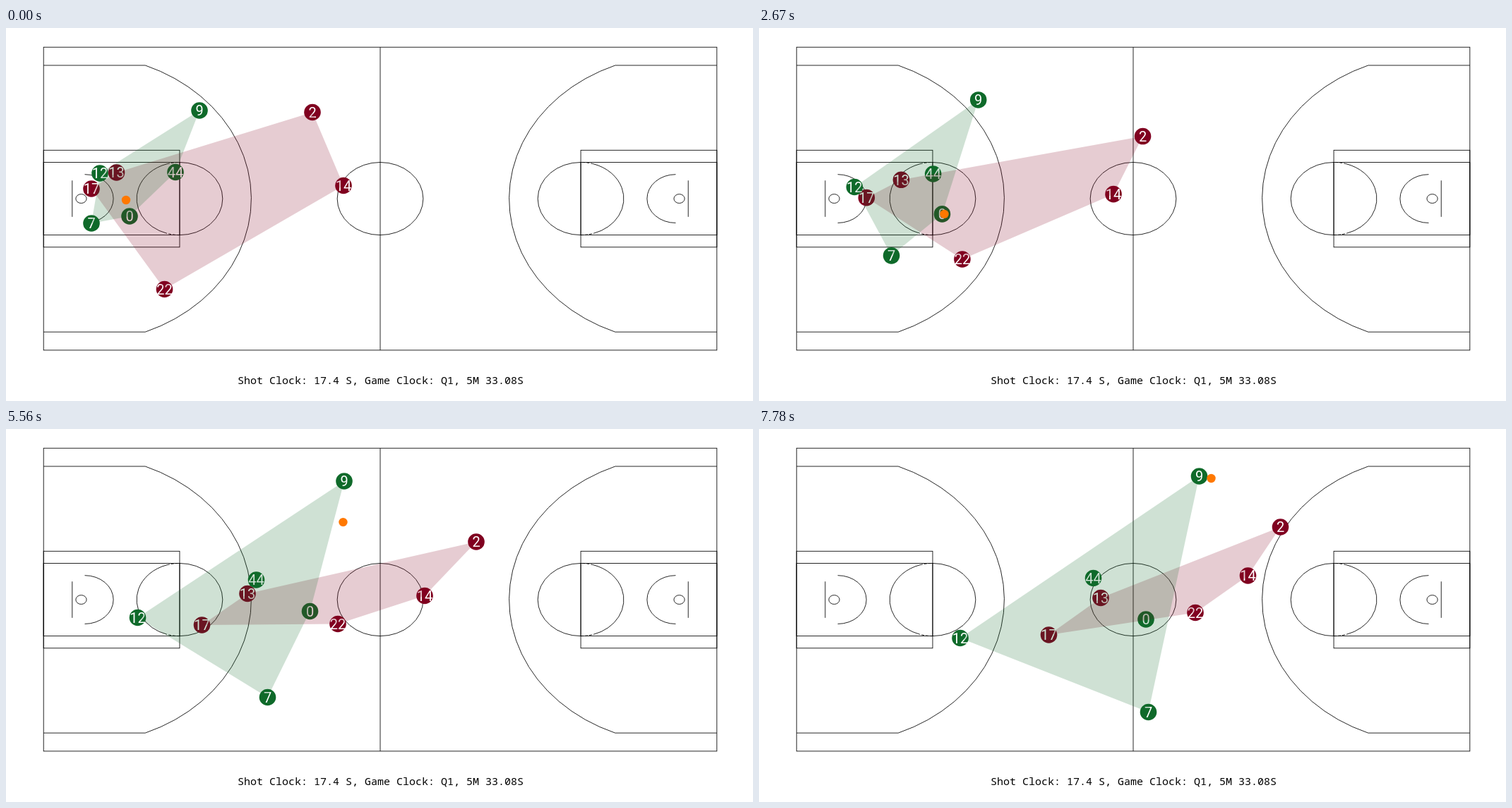
Recreate the animation shown at these times as an HTML page with a canvas. Size 1058x529 px, loop 8000 ms.

```html
<!DOCTYPE html>
<html lang="en">
<head>
<meta charset="utf-8">
<title>Court tracking</title>
<style>
  html, body { margin: 0; width: 100%; height: 100%; overflow: hidden; background: #fff; }
  canvas { display: block; }
</style>
</head>
<body>
<canvas id="stage" width="1058" height="529"></canvas>
<script>
const ctx = document.getElementById('stage').getContext('2d');
const LOOP = 8000, STEPS = 36;

// Court is 94 by 50 feet
const FT_X = 10.145, FT_Y = 8.594;
const courtX = feet => 53.2 + feet * FT_X;
const courtY = feet => 27.2 + feet * FT_Y;

// Each player runs a smooth curve through five points
const keys = [0, 8, 16, 24, 34];
const red = { color: '#800020', players: {
  2:  [[434, 119.5], [506, 146], [582.5, 158], [666, 160], [738.5, 139]],
  13: [[156.5, 205], [179, 215.5], [234.5, 216], [342, 233.5], [484, 239.5]],
  14: [[478, 223.5], [490.5, 233.5], [521, 236.5], [593, 236.5], [692.5, 208]],
  17: [[121, 228], [136, 230.5], [179, 253.5], [277.5, 278], [410.5, 292]],
  22: [[224.5, 370.5], [250.5, 343.5], [338.5, 311.5], [470, 276.5], [618, 260.5]]
} };
const green = { color: '#0f6a2a', players: {
  0:  [[175, 267], [216, 267], [312.5, 260.5], [430.5, 258.5], [548, 270]],
  7:  [[121, 277], [155, 300], [233, 347], [370.5, 380.5], [551.5, 401.5]],
  9:  [[274, 117], [280.5, 109], [355.5, 93.5], [479, 74], [623.5, 67]],
  12: [[133, 206], [133.5, 216], [142.5, 237.5], [186.5, 267.5], [285, 296.5]],
  44: [[240, 204.5], [234, 203.5], [270.5, 211], [354.5, 214], [473.5, 211.5]]
} };

// Cubic Hermite curve through the key points
function along(path, t) {
  const last = keys.length - 1;
  let i = 0;
  while (i < last - 1 && t >= keys[i + 1]) i++;
  const gap = keys[i + 1] - keys[i], u = (t - keys[i]) / gap;
  return [0, 1].map(axis => {
    const slope = n => (path[n + 1][axis] - path[n][axis]) / (keys[n + 1] - keys[n]);
    const tangent = n => {
      if (n === 0) return 1.5 * slope(0) - 0.5 * tangent(1);
      if (n === last) return 1.5 * slope(last - 1) - 0.5 * tangent(last - 1);
      const before = keys[n] - keys[n - 1], after = keys[n + 1] - keys[n];
      return (slope(n - 1) * after + slope(n) * before) / (before + after);
    };
    const a = path[i][axis], b = path[i + 1][axis];
    return a + (b - a) * u * u * (3 - 2 * u)
      + gap * u * (1 - u) * (tangent(i) * (1 - u) - tangent(i + 1) * u);
  });
}

// Player 0 dribbles, then passes to player 9
function ballAt(t) {
  const [x0, y0] = along(green.players[0], t);
  const [x9, y9] = along(green.players[9], t);
  const swing = Math.cos(Math.PI * t / 8) * Math.exp(-t / 10);
  const passed = Math.min(1, Math.max(0, (t - 18.4) / 8));
  const mix = (a, b) => a + (b - a) * passed;
  return [mix(x0 + 3 - 8 * swing, x9 + 17), mix(y0 - 23 * swing, y9 + 3)];
}

function convexHull(points) {
  const sorted = [...points].sort((a, b) => a[0] - b[0] || a[1] - b[1]);
  const half = list => {
    const chain = [];
    for (const p of list) {
      while (chain.length > 1) {
        const [a, b] = chain.slice(-2);
        if ((b[0] - a[0]) * (p[1] - a[1]) > (b[1] - a[1]) * (p[0] - a[0])) break;
        chain.pop();
      }
      chain.push(p);
    }
    return chain.slice(0, -1);
  };
  return [...half(sorted), ...half(sorted.reverse())];
}

// Court shapes, all measured in feet
function line(x1, y1, x2, y2) {
  ctx.beginPath();
  ctx.moveTo(courtX(x1), courtY(y1));
  ctx.lineTo(courtX(x2), courtY(y2));
  ctx.stroke();
}

function box(x, y, width, height) {
  ctx.strokeRect(courtX(x), courtY(y), width * FT_X, height * FT_Y);
}

function arc(x, radius, from = 0, to = 2 * Math.PI) {
  ctx.beginPath();
  ctx.ellipse(courtX(x), courtY(25), radius * FT_X, radius * FT_Y, 0, from, to);
  ctx.stroke();
}

function drawHalfCourt() {
  const quarter = Math.PI / 2, dashed = 0.3, bend = Math.asin(22 / 23.75);
  box(0, 17, 19, 16);
  box(0, 19, 19, 12);
  line(0, 3, 14.2, 3);
  line(0, 47, 14.2, 47);
  arc(5.25, 23.75, -bend, bend);
  arc(19, 6, -quarter, quarter);
  arc(19, 6, quarter + dashed, 3 * quarter - dashed);
  ctx.setLineDash([4, 2]);
  arc(19, 6, quarter, quarter + dashed);
  arc(19, 6, 3 * quarter - dashed, 3 * quarter);
  ctx.setLineDash([]);
  arc(5.75, 4, -quarter, quarter);
  arc(5.25, 0.75);
  line(4, 22, 4, 28);
}

function drawCourt() {
  ctx.strokeStyle = '#000';
  ctx.lineWidth = 0.85;
  box(0, 0, 94, 50);
  line(47, 0, 47, 50);
  arc(47, 6);
  drawHalfCourt();
  ctx.save();
  ctx.translate(2 * courtX(47), 0);
  ctx.scale(-1, 1);
  drawHalfCourt();
  ctx.restore();
}

function disc([x, y], radius, color) {
  ctx.fillStyle = color;
  ctx.beginPath();
  ctx.arc(x, y, radius, 0, 2 * Math.PI);
  ctx.fill();
}

function drawPlayers({ color, players }, t) {
  ctx.font = '20px Roboto, sans-serif';
  for (const [number, path] of Object.entries(players)) {
    const [x, y] = along(path, t);
    disc([x, y], 11.8, color);
    ctx.fillStyle = '#fff';
    ctx.fillText(number, x, y + 7.2);
  }
}

function drawArea({ color, players }, t) {
  ctx.globalAlpha = 0.2;
  ctx.fillStyle = color;
  ctx.beginPath();
  convexHull(Object.values(players).map(path => along(path, t))).forEach(p => ctx.lineTo(...p));
  ctx.fill();
  ctx.globalAlpha = 1;
}

// Play lags by one step between steps 16 and 20
const trackTime = step => step - Math.min(1, Math.max(0, (step - 16) / 4));

function draw(now) {
  const step = Math.floor((now % LOOP + 2.5) / (LOOP / STEPS)) % STEPS;
  const t = trackTime(step);
  ctx.fillStyle = '#fff';
  ctx.fillRect(0, 0, 1058, 529);
  ctx.textAlign = 'center';
  drawCourt();
  [red, green].forEach(team => drawPlayers(team, t));
  [red, green].forEach(team => drawArea(team, t));
  disc(ballAt(t), 6.2, '#ff7800');
  ctx.fillStyle = '#000';
  ctx.font = '15px "Noto Sans Mono", monospace';
  ctx.fillText('Shot Clock: 17.4 S, Game Clock: Q1, 5M 33.08S', 530.4, 505);
}

const start = performance.now();
function tick() {
  draw(performance.now() - start);
  requestAnimationFrame(tick);
}
tick();
</script>
</body>
</html>
```
